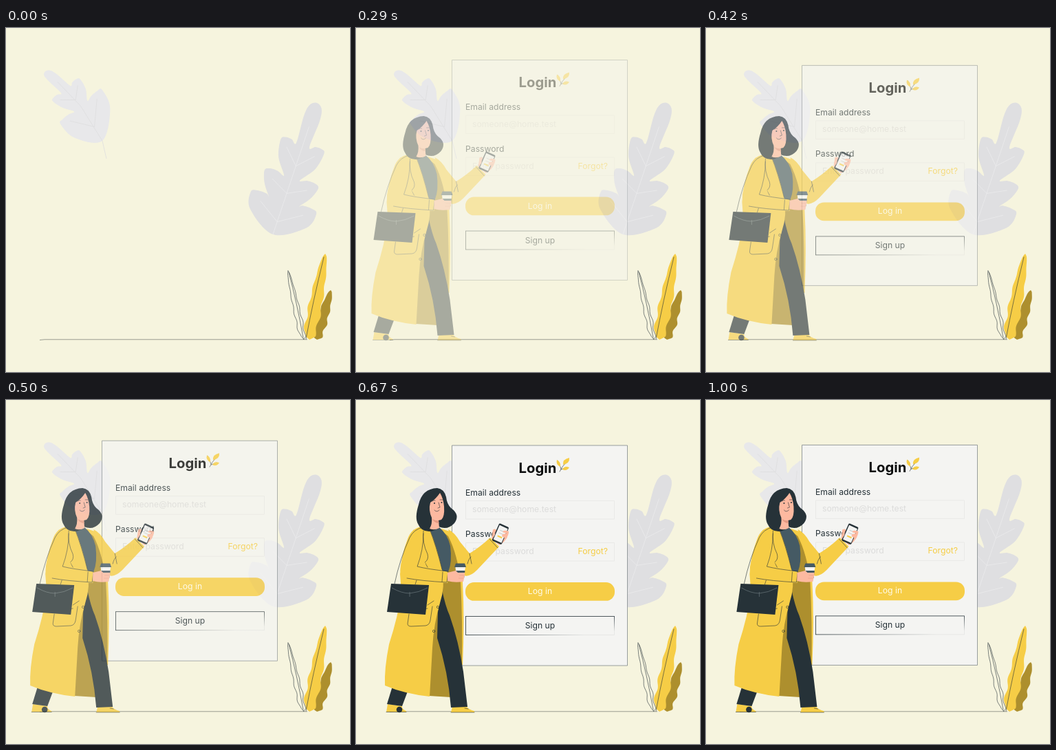
Animation, 500 px wide and 500 px high, one loop 1040 ms. Source, as an HTML page:

```html
<!DOCTYPE html>
<html lang="en">
<head>
<meta charset="utf-8">
<title>Login</title>
<style>
  html, body { margin: 0; height: 100%; overflow: hidden; background: #f6f4de; }
  svg { display: block; width: 100vw; height: 100vh; }
  text { font: 12.2px Inter, "Open Sans", sans-serif; fill: #263238; }
  .title { font-size: 20.3px; font-weight: 650; fill: #0b0d0e; }
  .mid { text-anchor: middle; }
  .hint { fill: #dcdcdb; }
  .line { fill: none; stroke: #263238; stroke-width: .6; stroke-linecap: round; stroke-linejoin: round; }
  .yellow { fill: #f6cd46; }
  .brown { fill: #ad8f2e; }
  .dark { fill: #263238; }
  .slate { fill: #455a64; }
  .paper { fill: #f4f4f2; }
  .skin { fill: #fdb9a0; }
  .fold { fill: none; stroke: #e59a83; stroke-width: .6; }
  .pale { fill: #e8e8ea; }
  .grey { fill: #dfdfe1; }
  .palevein { fill: none; stroke: #dededf; stroke-width: .8; }
  .greyvein { fill: none; stroke: #ebebec; stroke-width: .8; }
</style>
</head>
<body>
<svg viewBox="0 0 500 500">
  <defs>
    <linearGradient id="fade" x2="1" y2="1">
      <stop offset=".5" stop-color="#263238"/>
      <stop offset=".9" stop-color="#263238" stop-opacity=".08"/>
    </linearGradient>
  </defs>

  <g id="plants">
    <path d="M49 453.500L56 452.800H438" fill="none" stroke="#8f9186" stroke-width=".9"/>
  </g>

  <g id="panel">
    <path class="paper" stroke="#7f878a" stroke-width=".8" d="M139.500 66H394.500V386H139.500Z"/>
    <text class="title" x="236.500" y="105.700">Login</text>
    <path class="line" d="M296 104Q299 97 306 90M298 100Q297 96 293 88M298 101L306 98"/>
    <path class="yellow" d="M301 94Q300 86 310 84Q311 92 301 94M297 97Q290 94 292 87Q298 90 297 97M300 101Q303 95 310 98Q306 104 300 101"/>
    <text x="159" y="138.700">Email address</text>
    <path fill="none" stroke="#e9e9e7" d="M159.500 146.500H375.500V173H159.500ZM159.500 207.500H375.500V234H159.500Z"/>
    <text class="hint" x="169" y="163">someone@home.test</text>
    <text x="159" y="199">Password</text>
    <text class="hint" x="169" y="224">Enter password</text>
    <text x="322.500" y="224" style="fill:#f5cd45">Forgot?</text>
    <rect class="yellow" x="159" y="265" width="217" height="26.800" rx="12.500"/>
    <text class="mid" x="267.500" y="282" style="fill:#fffbe8">Log in</text>
    <rect x="159.500" y="314.500" width="216" height="27" fill="none" stroke="url(#fade)" stroke-width=".8"/>
    <text class="mid" x="267.500" y="332">Sign up</text>
  </g>

  <g id="woman">
    <!-- shoes and far leg -->
    <path class="yellow" d="M46 442L67 445Q66 449 73 452V453.500H44ZM140 446L161 446Q164 450 172 452V454H138Z"/>
    <path class="line" d="M44 453.500H73M138 454H172M62 447L66 448M158 448L163 449"/>
    <circle class="dark" cx="63" cy="450" r="4.300"/>
    <path class="dark" d="M53 416L76 421L67 445L45 442Z"/>
    <!-- coat back, lining, shirt, near leg -->
    <path class="yellow" d="M124 187L136 191Q152 225 155 265Q158 320 155 385H140L130 240Z"/>
    <path class="brown" d="M122 188L134 198Q148 225 152 265Q155 320 154 385H140L138 432L106 430L112 330L124 270Z"/>
    <path class="slate" d="M106 187L121 185Q133 195 137 212Q140 236 134 250L124 254Z"/>
    <path class="dark" d="M125 276Q130 300 136 313Q149 350 156 395L162 446L138 447Q134 395 118 346L119 308Z"/>
    <!-- raised arm -->
    <path class="yellow" d="M134 188Q144 193 151 206L165 223Q180 214 195 200L208 213L176 247Q165 258 157 255Q151 250 146 228Z"/>
    <path class="line" d="M194 202L206 215M162 238Q164 230 167 228M165 223L168 238"/>
    <!-- hand with phone -->
    <path class="skin" d="M197 201L199 189Q203 185 205 192L214 190Q221 191 220 199Q217 206 208 211Z"/>
    <g transform="translate(210 195) rotate(24)">
      <rect class="dark" x="-8" y="-14" width="15.500" height="27.500" rx="2"/>
      <rect class="paper" x="-6.500" y="-11.500" width="13" height="22.500"/>
      <path d="M-3 -5H4M-3 -1H4" stroke="#c9c9c9" fill="none"/>
      <rect class="yellow" x="-3" y="3" width="7" height="2"/>
    </g>
    <path class="skin" d="M222 191Q214 188 213 192L219 194L213 195L212 198L217 201Q222 198 222 191M199 188Q203 190 202 196L198 202Z"/>
    <!-- coat front -->
    <path class="yellow" d="M95 184Q104 183 107 187Q118 215 125 246Q130 272 122 295Q113 325 111 360L107 431Q70 427 42 415Q41 390 48 355Q61 315 66 280L64 253Q66 225 75 202Q80 187 95 184Z"/>
    <path class="line" d="M107 188Q116 210 125 246M98 190Q96 208 104 224Q106 232 100 236L104 243"/>
    <path class="line" d="M77 311L75 325Q75 329 80 329L101 328Q107 327 108 320L111 300M104 298L113 292M79 308L104 303"/>
    <circle class="line" cx="119" cy="301" r="1.700"/>
    <circle class="line" cx="113" cy="336" r="1.700"/>
    <!-- lowered arm -->
    <path class="yellow" d="M84 188Q72 205 66 235Q62 250 68 257Q80 264 133 266L135 250L103 244Z"/>
    <path class="line" d="M98 194Q98 218 89 242Q105 246 134 249L132 265Q95 263 74 259M126 250L125 264"/>
    <!-- cup -->
    <path class="slate" d="M145 237.500H158L160 243H143Z"/>
    <path class="paper" d="M144.500 243H159L158 249H145Z"/>
    <path class="slate" d="M145 248H158.500L157 259H146Z"/>
    <path class="skin" d="M133 251L145 248L148 251H158V254L156 264Q143 266 133 263Z"/>
    <path class="fold" d="M150 255H157M149 259H156"/>
    <!-- bag -->
    <path class="line" d="M56 267Q64 230 78 200Q84 188 97 185M88 262L86 268"/>
    <path class="dark" d="M51 267L106 269L101 312L45 308Z"/>
    <path d="M52 273Q66 281 78 281Q91 280 104 273M78 279V286" fill="none" stroke="#6b777c" stroke-width=".7"/>
    <!-- head -->
    <path class="dark" d="M118 128Q96 129 91 152Q85 171 90 180Q95 192 108 191Q115 190 120 184Q133 190 143 179Q152 167 138 157Q132 151 131 141Q128 129 118 128Z"/>
    <path class="skin" d="M122 135Q127 143 128 155Q129 170 124 174L120 175L121 186Q114 190 107 187Q111 180 110 171Q105 160 108 149Q116 144 122 135Z"/>
    <path fill="#e59a83" d="M111 173Q116 176 120 175L120.500 179Q114 179 111 173Z"/>
    <path class="line" d="M120 149L122 156L119 157M111 147Q113 145 115 146M122 145L126 145M114 160Q117 164 121 160"/>
    <circle class="dark" cx="114" cy="150" r="1"/>
    <circle class="dark" cx="124.500" cy="149" r="1"/>
  </g>
</svg>
<script>
  const plants = document.getElementById("plants");
  const panel = document.getElementById("panel");
  const woman = document.getElementById("woman");

  function addPath(className, d) {
    const path = document.createElementNS("http://www.w3.org/2000/svg", "path");
    path.setAttribute("class", className);
    path.setAttribute("d", d);
    plants.append(path);
  }

  // Closed Catmull-Rom curve
  function smooth(points) {
    const at = i => points.at(i % points.length);
    let d = "M" + points[0];
    points.forEach((b, i) => {
      const [a, c, e] = [at(i - 1), at(i + 1), at(i + 2)];
      d += "C" + [b[0] + (c[0] - a[0]) / 6, b[1] + (c[1] - a[1]) / 6,
        c[0] - (e[0] - b[0]) / 6, c[1] - (e[1] - b[1]) / 6, ...c];
    });
    return d + "Z";
  }

  // Symmetric leaf along a bowed spine; each lobe is { t, w, notch } in spine lengths
  function lobedLeaf(name, [x0, y0], [x1, y1], bow, lobes) {
    const [dx, dy] = [x1 - x0, y1 - y0];
    const place = (t, w) => {
      const side = w + bow * Math.sin(Math.PI * t);
      return [x0 + dx * t - dy * side, y0 + dy * t + dx * side];
    };
    const edge = [];
    let veins = "M" + place(0, 0) + "L" + place(.45, 0) + "L" + place(.82, 0);
    let last = 0;
    for (const { t, w, notch } of lobes) {
      edge.push([(last + t) / 2, w * .85], [t, w], [t + .025, w * .83],
        [t + .025, w * .55], [t + .01, notch]);
      const root = place(last + (t - last) * .4, 0);
      for (const s of [-1, 1]) veins += "M" + root + "L" + place(t - .04, s * w * .65);
      last = t;
    }
    edge.push([.88, .06], [.97, .045]);
    const left = edge.map(([t, w]) => place(t, -w));
    const right = edge.map(([t, w]) => place(t, w)).reverse();
    addPath(name, smooth([[x0, y0], ...left, place(1, 0), ...right]));
    addPath(name + "vein", veins);
  }

  // Tapering blade with both edges waving together
  function frond(className, [x0, y0], [x1, y1], half, waves, wobble) {
    const STEPS = 30;
    const left = [], right = [];
    for (let i = 0; i <= STEPS; i++) {
      const t = i / STEPS, u = t ** .6;
      const x = x0 + (x1 - x0) * t + wobble * Math.sin(2 * Math.PI * waves * t + .5) * (1 - t);
      const y = y0 + (y1 - y0) * t;
      const w = half * Math.sqrt(4 * u * (1 - u));
      left.push([x - w, y]);
      right.unshift([x + w, y]);
    }
    addPath(className, smooth([...left, ...right]));
  }

  lobedLeaf("pale", [140, 164], [57, 63], .06, [
    { t: .44, w: .3, notch: .095 },
    { t: .69, w: .195, notch: .065 }]);
  addPath("palevein", "M140 164L146 190");
  lobedLeaf("grey", [388, 300], [452, 109], 0, [
    { t: .24, w: .25, notch: .115 },
    { t: .42, w: .205, notch: .06 },
    { t: .67, w: .165, notch: .05 }]);

  frond("brown", [451, 453], [472, 381], 8, 3.8, 2.2);
  frond("yellow", [440, 453], [464, 328], 9.5, 4.3, 2.2);
  addPath("line", "M436 452Q446 398 462 333");
  frond("line", [432, 452], [410, 353], 4.5, 4.5, 1.4);
  addPath("line", "M432 450Q423 400 411 355");

  const LOOP = 1040;
  const start = performance.now();

  // 24 steps per second, each starting on a multiple of 10 ms
  function stepAt(ms) {
    let step = 24;
    while (Math.round(step * 25 / 6) * 10 > ms) step--;
    return step;
  }

  // Slides in past its place, then drifts back more slowly
  function offsetAt(step) {
    const swing = (step - 19) * (step < 19 ? .142 : .1);
    return 1.7 - 18.7 * (1 - Math.cos(swing));
  }

  function draw() {
    const step = stepAt((performance.now() - start) % LOOP);
    const offset = offsetAt(step);
    const opacity = Math.max(0, Math.min(1, (step - 2.5) / 12));
    panel.setAttribute("transform", `translate(0 ${offset})`);
    woman.setAttribute("transform", `translate(${offset} 0)`);
    for (const part of [panel, woman]) part.setAttribute("opacity", opacity);
    requestAnimationFrame(draw);
  }
  draw();
</script>
</body>
</html>
```
